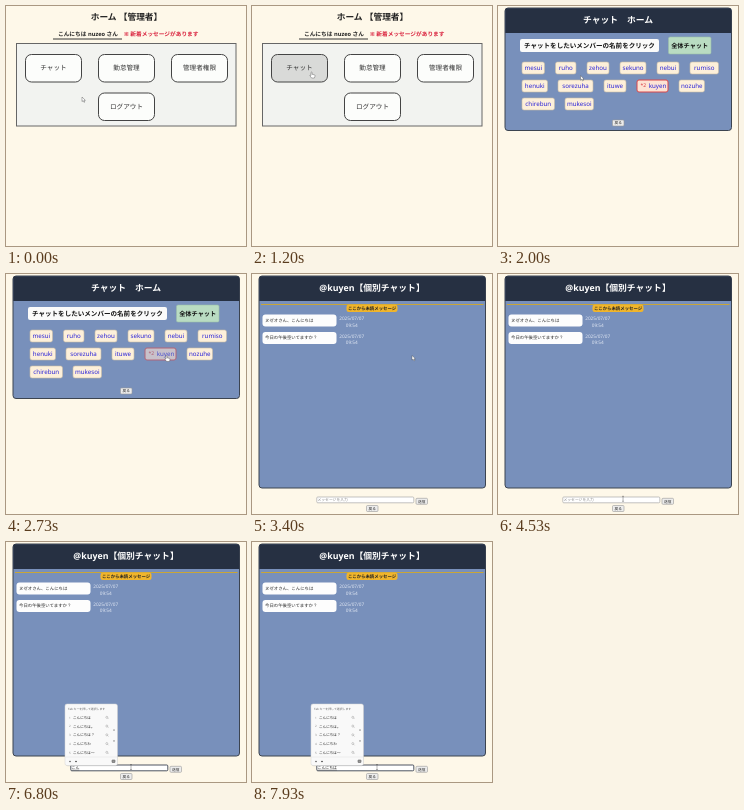
These frames come from a looping animation (240 by 240 pixels, 8 s). An HTML page:

```html
<!DOCTYPE html>
<html>
<head>
<meta charset="utf-8">
<style>
html, body { margin: 0; height: 100%; overflow: hidden; background: #fef8e9; }
svg { display: block; width: 100vw; height: 100vh; filter: blur(.35px); }
text { font-family: "Noto Sans", "Noto Sans CJK JP", sans-serif; text-rendering: geometricPrecision; white-space: pre; }
</style>
</head>
<body>
<svg id="stage" viewBox="0 0 240 240"></svg>
<script>
const stage = document.getElementById('stage');
const LOOP = 8000;
const BLUE = '#7890bb', NAVY = '#263042', INK = '#222';

const rect = (x, y, w, h, fill, stroke = 'none', r = 0, sw = 1) =>
  `<rect x="${x}" y="${y}" width="${w}" height="${h}" rx="${r}" fill="${fill}" stroke="${stroke}" stroke-width="${sw}"/>`;
const line = (x1, x2, y, color, sw = 1) =>
  `<path d="M${x1} ${y}H${x2}" stroke="${color}" stroke-width="${sw}"/>`;
// y is the vertical middle of the glyphs
const text = (s, x, y, size, fill = INK, weight = 400, anchor = 'start') =>
  `<text x="${x}" y="${y + size * 0.37}" font-size="${size}" fill="${fill}" font-weight="${weight}" text-anchor="${anchor}">${s}</text>`;
const mid = (s, x, y, size, fill, weight) => text(s, x, y, size, fill, weight, 'middle');
const inside = (p, x, y, w, h) => p.x >= x && p.x <= x + w && p.y >= y && p.y <= y + h;
const smallButton = (s, x, y) =>
  rect(x + .5, y + .5, 11.5, 6, '#ececec', '#999', 1, .6) + mid(s, x + 6.2, y + 3.4, 3.7, INK);

// Pointer stops: time, x, y
const stops = [[0, 76, 91], [200, 76, 91], [850, 59, 66], [1750, 59, 66], [2550, 160, 81.5],
  [3650, 160, 81.5], [4550, 125, 225], [LOOP, 125, 225]];

function pointer(t) {
  const i = stops.findIndex(s => s[0] > t);
  const [t0, x0, y0] = stops[i - 1], [t1, x1, y1] = stops[i];
  const u = (t - t0) / (t1 - t0), k = u * u * (3 - 2 * u);
  return { x: x0 + (x1 - x0) * k, y: y0 + (y1 - y0) * k, kind: 'arrow' };
}

const shapes = {
  arrow: 'M0 0V4.6L1.1 3.6L2 5.4L2.8 5L2 3.3H3.4Z',
  hand: 'M0 .4Q.6 -.3 1.1 .4V2.3L3.6 2.9Q4.2 3.2 3.9 4.5L3.4 6H.6L-1.2 3.6Q-1 2.8 0 3.5Z',
  beam: 'M-1 -2.5H1M0 -2.5V2.5M-1 2.5H1',
};

const drawPointer = p =>
  `<path d="${shapes[p.kind]}" transform="translate(${p.x} ${p.y})" fill="#fff" stroke="#444" stroke-width=".4"/>`;

const menu = [['チャット', 19.5, 48.5], ['勤怠管理', 92.5, 48.5], ['管理者権限', 165.5, 48.5], ['ログアウト', 92.5, 87]];

function home(p) {
  let out = mid('ホーム 【管理者】', 120.5, 11, 8.7, INK, 700)
    + text('こんにちは nuzeo さん', 52, 28.3, 5.7, INK, 700) + line(47, 116, 33, '#222', .9)
    + text('※ 新着メッセージがあります', 118, 28.3, 5.7, '#d9203c', 700)
    + rect(10.5, 37.5, 219.5, 82.5, '#f2f3f0', '#666');
  for (const [label, x, y] of menu) {
    const over = inside(p, x, y, 56, 27.5);
    if (over) p.kind = 'hand';
    out += rect(x, y, 56, 27.5, over ? '#d9dad8' : '#fcfdfb', '#444', 6)
      + mid(label, x + 28, y + 13.5, 6.6, '#333', 500);
  }
  return out;
}

// Name, left edge, right edge
const members = [
  [['mesui', 24, 46.5], ['ruho', 57.5, 78], ['zehou', 89, 111], ['sekuno', 122, 148], ['nebui', 159, 181], ['rumiso', 192, 220.5]],
  [['henuki', 24, 49.5], ['sorezuha', 60, 95], ['ituwe', 106, 128], ['kuyen', 139, 170], ['nozuhe', 181, 206.5]],
  [['chirebun', 24, 56.5], ['mukesoi', 67, 95.5]],
];

const panel = (height, title) =>
  rect(7, 2, 226.5, height, BLUE, '#3c4450', 3)
  + `<path d="M7.300 27V4Q7.300 2.300 9 2.300H231.500Q233.200 2.300 233.200 4V27Z" fill="${NAVY}"/>`
  + mid(title, 120, 14.2, 8.8, '#fff', 700);

function list(p) {
  let out = panel(122.5, 'チャット　ホーム')
    + rect(22, 33, 139, 13, '#fbfbfa', 'none', 2)
    + text('チャットをしたいメンバーの名前をクリック', 26, 39.5, 6.55, '#111', 700)
    + rect(170.5, 31, 42.5, 17, '#b9dcc2', '#9cc0aa', 1.5, .6)
    + mid('全体チャット', 191.7, 39.5, 6.2, '#111', 700);
  members.forEach((row, r) => row.forEach(([name, x0, x1]) => {
    const y = 56 + r * 18, w = x1 - x0, unread = name === 'kuyen';
    const over = inside(p, x0, y, w, 12);
    if (over) p.kind = 'hand';
    out += `<g opacity="${over ? .6 : 1}">`
      + rect(x0, y, w, 12, unread ? '#fde3d4' : '#fdf0da', unread ? '#d8474a' : '#c9bda6', 2, unread ? 1 : .6)
      + (unread ? text('*2', 142.5, y + 5.5, 5, '#d8303a') : '')
      + mid(name, unread ? 159.5 : x0 + w / 2, y + 5.7, 6.2, '#2a22d8') + '</g>';
  }));
  return out + smallButton('戻る', 114, 113.5);
}

const keys = ['', 'k', 'こ', 'こn', 'こん', 'こんn', 'こんに', 'こんにc', 'こんにch', 'こんにち', 'こんにちh', 'こんにちは'];
const typed = t => keys[Math.max(0, Math.min(keys.length - 1, Math.floor((t - 6300) / 120)))];

function suggestions() {
  let out = rect(59.7, 162.3, 52, 62, '#00000022', 'none', 2)
    + rect(59, 162, 52.5, 61.5, '#f9f9f9', '#d5d5d5', 2, .5)
    + text('Tab キーを押して選択します', 62, 166.5, 2.9, '#666');
  ['こんにちは', 'こんにちは。', 'こんにちは？', 'こんにちわ', 'こんにちは～'].forEach((s, i) => {
    const y = 175.5 + i * 8.75;
    out += text(i + 1, 63, y, 3, '#888') + text(s, 67, y, 3.6, '#222', 500)
      + `<path d="M101.500 ${y + .5}l1 1" stroke="#888" stroke-width=".4"/>`
      + `<circle cx="100.8" cy="${y - .2}" r="1" fill="none" stroke="#888" stroke-width=".4"/>`;
  });
  return out + '<path d="M107 188.500l1 -1.500l1 1.500zM107 198.500l1 1.500l1 -1.500z" fill="#777"/>'
    + line(59.5, 111, 215, '#ddd', .5)
    + '<circle cx="64" cy="219.5" r=".8" fill="#555"/><circle cx="70" cy="219.5" r=".8" fill="#333"/>'
    + rect(106, 218, 3, 2.5, '#999', '#444', .4, .5);
}

function chat(p, t) {
  let out = panel(212, '@kuyen【個別チャット】')
    + line(9, 231.5, 30.5, '#c9a637', 1)
    + rect(94.5, 30.5, 51, 7.5, '#f0b52c', 'none', 2.5)
    + mid('ここから未読メッセージ', 120, 34.2, 4.4, '#222', 700);
  ['ヌゼオさん、こんにちは', '今日の午後空いてますか？'].forEach((s, i) => {
    const y = 40.5 + i * 17.5;
    out += rect(10.5, y, 74, 12, '#fdfdfd', 'none', 3) + text(s, 13, y + 5.5, 4.4, '#222')
      + mid('2025/07/07', 99.7, y + 4, 4.7, '#e3e9f4') + mid('09:54', 99.7, y + 10.5, 4.7, '#e3e9f4');
  });
  const focus = t >= 5000, value = typed(t);
  if (inside(p, 64, 222, 98, 8)) p.kind = 'beam';
  out += rect(64.8, 223, 97, 5.8, '#fff', focus ? '#3a4252' : '#aaa', 1, focus ? .9 : .7)
    + (value
      ? text(value, 65.5, 226, 3.9, '#222') + line(65.5, 65.5 + value.length * 3.9, 228.1, '#444', .4)
      : text('メッセージを入力', 65.5, 226, 3.8, '#888'))
    + smallButton('送信', 163.5, 223.8) + smallButton('戻る', 114, 231);
  return out + (value.length > 1 ? suggestions() : '');
}

function frame(now) {
  const t = now % LOOP, p = pointer(t);
  const page = t < 1270 ? home : t < 3000 ? list : chat;
  stage.innerHTML = page(p, t) + drawPointer(p);
  requestAnimationFrame(frame);
}
requestAnimationFrame(frame);
</script>
</body>
</html>
```
